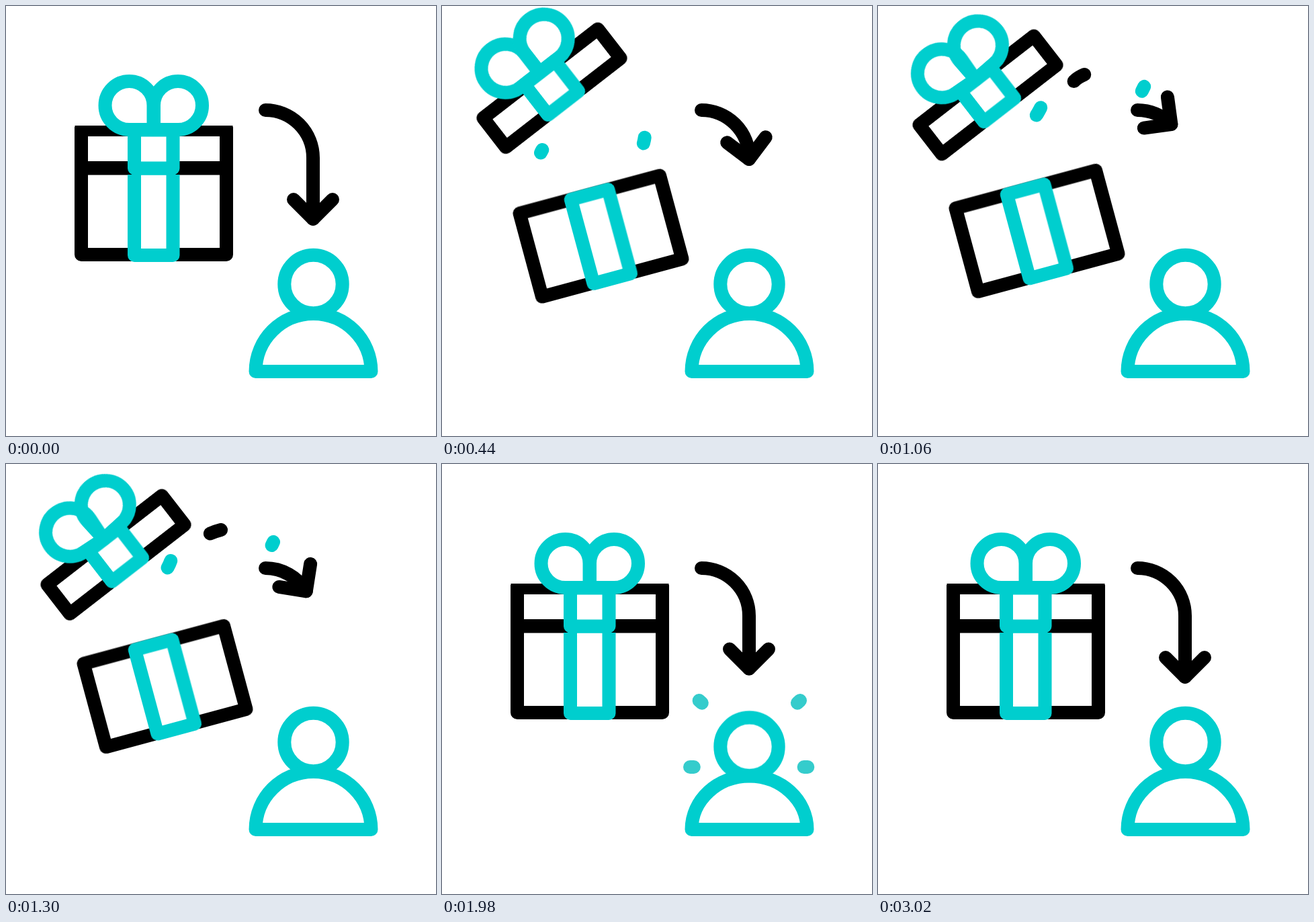
Recreate the animation shown at these times as an HTML page. Size 640 px wide and 640 px high, loop 3.22 s.

```html
<!DOCTYPE html>
<html lang="en">
<head>
<meta charset="utf-8">
<title>Gift to person</title>
<style>
  html, body { margin: 0; width: 100%; height: 100%; overflow: hidden; background: #fff; }
  svg { display: block; width: 100vw; height: 100vh; }

  svg * { animation: 3220ms linear infinite; }
  path, circle { fill: none; stroke-width: 20; stroke-linecap: round; stroke-linejoin: round; }
  .ink { stroke: #000; }
  .teal { stroke: #00cece; }
  .solid { fill: #fff; }

  /* Gift */
  #lid { transform-origin: 220px 213.5px; animation-name: lid; }
  #box { transform-origin: 220px 305.7px; animation-name: box; }
  .loop { transform-origin: 220px 184px; animation-name: pinch; }
  .left { --tilt: 4.5deg; }
  .right { --tilt: -4.5deg; }
  #rim { animation-name: rim; animation-timing-function: step-end; }
  #flat { animation-name: flat; animation-timing-function: step-end; }

  @keyframes lid {
    0%, .62% { transform: translate(0, 0) rotate(0); animation-timing-function: ease-in; }
    7.14% { transform: translate(-24px, -66px) rotate(-22deg); animation-timing-function: ease-out; }
    13.04% { transform: translate(-56.5px, -91.7px) rotate(-37.8deg); }
    25.47% { transform: translate(-56.5px, -83.5px) rotate(-37.8deg); }
    40.37% { transform: translate(-56.5px, -78.5px) rotate(-37.8deg); }
    44.1% { transform: translate(-56.5px, -77.5px) rotate(-37.8deg); animation-timing-function: ease-in; }
    50.93% { transform: translate(-24px, -61.5px) rotate(-22.7deg); animation-timing-function: ease-out; }
    60.25%, 100% { transform: translate(0, 0) rotate(0); }
  }
  @keyframes box {
    0%, .62% { transform: translate(0, 0) rotate(0); animation-timing-function: ease-in-out; }
    13.04% { transform: translate(16.5px, 37px) rotate(-15.1deg); }
    25.47% { transform: translate(16.5px, 33px) rotate(-15.1deg); }
    40.37% { transform: translate(16.5px, 25.3px) rotate(-15.1deg); }
    44.1% { transform: translate(16.5px, 24.9px) rotate(-15.1deg); animation-timing-function: ease-in; }
    50.93% { transform: translate(10px, 15.8px) rotate(-9.5deg); animation-timing-function: ease-out; }
    60.25%, 100% { transform: translate(0, 0) rotate(0); }
  }
  @keyframes pinch {
    0%, 13.04%, 49.69%, 100% { transform: rotate(0); }
    40.37%, 42% { transform: rotate(var(--tilt)); }
  }
  @keyframes rim {
    0% { visibility: hidden; }
    .62% { visibility: visible; }
    60.25%, 100% { visibility: hidden; }
  }
  @keyframes flat {
    0% { visibility: visible; }
    .62% { visibility: hidden; }
    60.25%, 100% { visibility: visible; }
  }

  /* Confetti: --o is where the visible dash begins, --d its length */
  .early { animation-name: early; }
  .late { animation-name: late; }
  @keyframes early {
    0%, 6.21% { stroke-dasharray: 0 200; stroke-dashoffset: 0; opacity: 1; animation-timing-function: ease-out; }
    13.66% { stroke-dasharray: var(--d1) 200; stroke-dashoffset: var(--o1); }
    25.47% { stroke-dasharray: var(--d2) 200; stroke-dashoffset: var(--o2); }
    31.06% { stroke-dasharray: 0 200; stroke-dashoffset: -100; opacity: 1; }
    31.07%, 100% { stroke-dasharray: 0 200; stroke-dashoffset: -100; opacity: 0; }
  }
  @keyframes late {
    0%, 14.91% { stroke-dasharray: 0 200; stroke-dashoffset: 0; opacity: 1; animation-timing-function: ease-out; }
    25.47% { stroke-dasharray: var(--d1) 200; stroke-dashoffset: var(--o1); }
    40.37% { stroke-dasharray: var(--d2) 200; stroke-dashoffset: var(--o2); }
    44.72% { stroke-dasharray: 0 200; stroke-dashoffset: -100; opacity: 1; }
    44.73%, 100% { stroke-dasharray: 0 200; stroke-dashoffset: -100; opacity: 0; }
  }

  /* Arrow: the shaft is trimmed while the head rides its path */
  #shaft { stroke-dasharray: 202.5 300; animation-name: shaft; }
  #head {
    offset-path: path("M386 155A71 71 0 0 1 457 226V317");
    animation-name: ride, turn;
  }
  #shaft, #head { animation-timing-function: cubic-bezier(.37, 0, .63, 1); }
  #head { animation-timing-function: cubic-bezier(.37, 0, .63, 1), linear; }
  @keyframes shaft {
    0%, .62%, 49.69%, 50.31%, 67.7%, 75.78%, 93.79%, 100% { stroke-dashoffset: 0; }
    23.6%, 37.76% { stroke-dashoffset: 146.5; }
    59.01%, 84.78% { stroke-dashoffset: 15.5; }
  }
  @keyframes ride {
    0%, .62%, 49.69%, 50.31%, 67.7%, 75.78%, 93.79%, 100% { offset-distance: 202.5px; }
    23.6%, 37.76% { offset-distance: 56px; }
    59.01%, 84.78% { offset-distance: 187px; }
  }
  @keyframes turn {
    0%, .62%, 49.69%, 100% { offset-rotate: auto 0deg; }
    13.66%, 37.76% { offset-rotate: auto -8deg; }
    40.37% { offset-rotate: auto -5deg; }
  }

  /* Person */
  #face { animation-name: nod; }
  #body { animation-name: squash; }
  #face, #body { animation-timing-function: cubic-bezier(.37, 0, .63, 1); }
  @keyframes nod {
    0%, 47.83%, 67.08%, 100% { transform: translateY(0); }
    57.45% { transform: translateY(10.6px); }
  }
  @keyframes squash {
    0%, 47.83%, 67.08%, 100% { d: path("M371.5 544C371.5 496.5 410 458 457.5 458C505 458 543.5 496.5 543.5 544Z"); }
    57.45% { d: path("M371.5 544C371.5 502.4 410 468.6 457.5 468.6C505 468.6 543.5 502.4 543.5 544Z"); }
  }
  .spark { stroke: #35cccc; animation-name: spark; }
  @keyframes spark {
    0%, 50.3% { stroke-dasharray: 0 200; stroke-dashoffset: 0; opacity: 0; }
    50.31% { stroke-dasharray: 0 200; stroke-dashoffset: 0; opacity: 1; animation-timing-function: ease-in; }
    61.49% { stroke-dasharray: 15 200; stroke-dashoffset: -54; animation-timing-function: ease-out; }
    70.18% { stroke-dasharray: 0 200; stroke-dashoffset: -100; opacity: 1; }
    70.19%, 100% { stroke-dasharray: 0 200; stroke-dashoffset: -100; opacity: 0; }
  }
</style>
</head>
<body>
<svg viewBox="0 0 640 640">
  <g id="confetti">
    <path class="teal early" pathLength="100" style="--d1:4.3;--o1:-95.7;--d2:0;--o2:-100" d="M195 300C180 215 158 192 147 218.5"/>
    <path class="teal early" pathLength="100" style="--d1:6.3;--o1:-89;--d2:4.5;--o2:-95.5" d="M250 300C285 200 312 165 298 211"/>
    <path class="teal late" pathLength="100" style="--d1:8.5;--o1:-80;--d2:7;--o2:-91" d="M214 300C212 220 218 190 238 159C242 152 245 146 246 141"/>
    <path class="teal late" pathLength="100" style="--d1:4.3;--o1:-91.7;--d2:2.6;--o2:-97.4" d="M270 300C320 250 372 172 398 116"/>
    <path class="ink late" pathLength="100" style="--d1:9;--o1:-79;--d2:7.6;--o2:-92.4" d="M262 300C268 220 274 148 283 125C289 111 300 103 320 98"/>
  </g>

  <g id="box">
    <path class="ink solid" d="M112 241.5H328V370H112Z"/>
    <path class="teal solid" d="M191 241.5H248.5V371H191Z"/>
  </g>

  <g id="lid">
    <path id="rim" class="ink solid" d="M112 186H328V241H112Z"/>
    <g id="flat">
      <path class="ink solid" style="stroke-linecap:butt" d="M112 180V241H328V180"/>
      <path class="ink" style="stroke-width:16;stroke-linecap:butt" d="M102.5 186H337.5"/>
    </g>
    <path class="teal solid" d="M191 184.5H248.5V241.5H191Z"/>
    <path class="teal loop left" d="M220 184H183.5A36 36 0 1 1 219.5 148V184"/>
    <path class="teal loop right" d="M220 184H256A36 36 0 1 0 220 148V184"/>
  </g>

  <path id="shaft" class="ink" d="M386 155A71 71 0 0 1 457 226V317"/>
  <path id="head" class="ink" d="M-29 -29L0 0L-29 29"/>

  <path class="spark" pathLength="100" d="M402 369L374 344.5"/>
  <path class="spark" pathLength="100" d="M514 369L541.5 344.5"/>
  <path class="spark" pathLength="100" d="M396 451H357"/>
  <path class="spark" pathLength="100" d="M518 451H556"/>
  <circle id="face" class="teal" cx="457.5" cy="414" r="43.2"/>
  <path id="body" class="teal" d="M371.5 544C371.5 496.5 410 458 457.5 458C505 458 543.5 496.5 543.5 544Z"/>
</svg>
</body>
</html>
```
